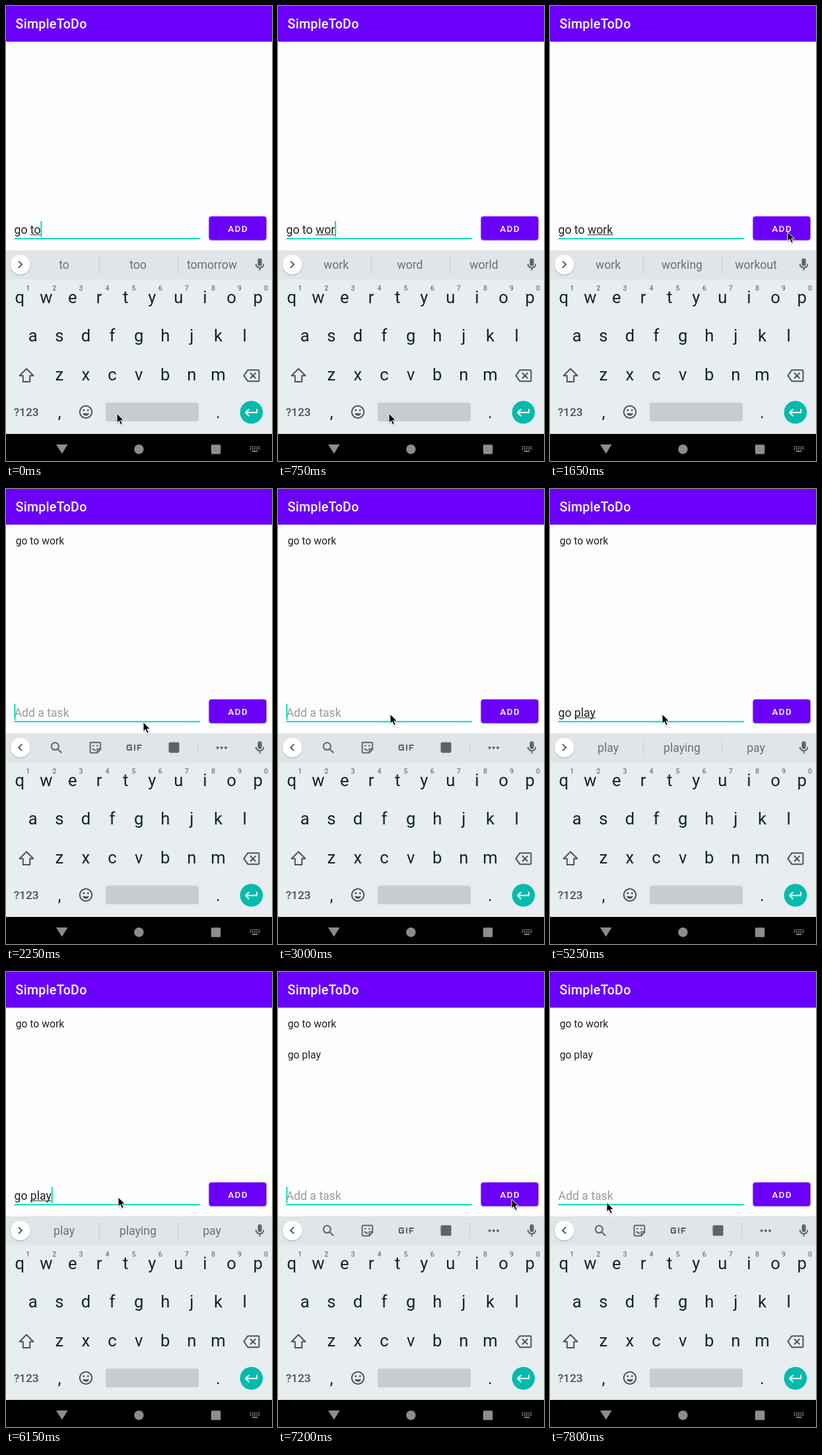
An HTML page for the animation above (8000 ms loop, 403x689 px).

```html
<!DOCTYPE html>
<html lang="en">
<head>
<meta charset="utf-8">
<title>To-do list</title>
<style>
  html, body { margin: 0; width: 100%; height: 100%; overflow: hidden; background: #fff; }
  svg { display: block; width: 403px; height: 689px; }
  text { font-family: Roboto, sans-serif; white-space: pre; }
  .mid { text-anchor: middle; }
  .medium { font-weight: 500; }
  .item { font-size: 15.7px; fill: #212121; }
  .field { font-size: 17.65px; }
  .key { font-size: 25.6px; fill: #0c262e; }
  .digit { font-size: 10.6px; fill: #6d777b; font-weight: 500; }
  .hint { font-size: 17.6px; fill: #667176; }
  .icon { fill: none; stroke: #5b666b; stroke-width: 2; }
  .solid { fill: #5b666b; }
  .dark { fill: none; stroke: #47565c; stroke-width: 2; }
</style>
</head>
<body>
<svg viewBox="0 0 403 689">
  <defs>
    <filter id="soft" x="-20%" y="-20%" width="140%" height="150%">
      <feDropShadow dx="0" dy="1" stdDeviation="1" flood-opacity=".3"/>
    </filter>
    <clipPath id="buttonClip"><rect x="307.5" y="318.5" width="87" height="36" rx="4"/></clipPath>
  </defs>

  <rect width="403" height="689" fill="#fefefe"/>
  <rect width="403" height="54" fill="#6a00fb"/>
  <text class="medium" x="14.6" y="33.8" font-size="19.6" letter-spacing=".245" fill="#fff">SimpleToDo</text>

  <text class="item" id="item0" x="14.7" y="83.6">go to work</text>
  <text class="item" id="item1" x="14.7" y="131">go play</text>

  <text class="field" id="placeholder" x="12.5" y="344.6" fill="#9a9a9a">Add a task</text>
  <text class="field" id="entry" x="12.5" y="344.6" fill="#212121"></text>
  <rect id="compose" y="346" height="1" fill="#333"/>
  <rect x="12.5" y="351.3" width="281.5" height="2" fill="#03dac5"/>
  <rect id="caret" y="325.5" width="2" height="24.5" fill="#03dac5"/>

  <rect x="307.5" y="318.5" width="87" height="36" rx="4" fill="#6a00fb" filter="url(#soft)"/>
  <circle id="ripple" r="40" fill="#fff" opacity=".16" clip-path="url(#buttonClip)"/>
  <text class="mid medium" x="351.5" y="342" font-size="13.7" letter-spacing="1.22" fill="#fff">ADD</text>

  <rect y="370" width="403" height="278" fill="#e8edf0"/>
  <rect y="370" width="403" height="43.5" fill="#e0e5e8"/>
  <circle cx="21.7" cy="391.5" r="14.7" fill="#fff" filter="url(#soft)"/>
  <path id="chevron" class="dark"/>
  <g id="mic">
    <rect class="solid" x="381.4" y="382" width="6.2" height="11.8" rx="3.1"/>
    <path class="icon" stroke-width="1.8" d="M378.6 390.5a5.9 5.9 0 0 0 11.8 0M384.5 396.5v4"/>
  </g>

  <g id="hints">
    <path d="M141.5 379.5v24M260.5 379.5v24" stroke="#c6cbce"/>
    <text class="hint mid" x="88" y="398.3"></text>
    <text class="hint mid" x="200" y="398.3"></text>
    <text class="hint mid" x="312" y="398.3"></text>
  </g>

  <g id="tools">
    <circle class="icon" cx="74.3" cy="389.6" r="5.5"/>
    <path class="icon" stroke-width="2.4" d="M78.4 393.7l5.8 5.8"/>
    <path class="icon" stroke-width="1.7" d="M129.2 383.8h12.4q1.6 0 1.6 1.6v9l-5 5h-9q-1.6 0-1.6-1.6v-12.4q0-1.6 1.6-1.6zM143 393.5h-4.6v5.6M131.2 392.6q1.4 3.2 5 2.8"/>
    <path class="icon" d="M131.2 388.8h2.4M137 388.8h2.4"/>
    <path class="icon" stroke-width="2.2" d="M191 388h-6.3q-1 0-1 1v5q0 1 1 1h5.2v-3.7h-3M195 386.9v9.2M199.7 396.1v-8.1h6M199.7 392h4.6"/>
    <rect class="solid" x="246.5" y="383.5" width="16" height="16" rx="2"/>
    <path d="M290.5 379.5v24" stroke="#c6cbce"/>
    <g class="solid"><circle cx="320.6" cy="391.8" r="2"/><circle cx="326.8" cy="391.8" r="2"/><circle cx="333" cy="391.8" r="2"/></g>
  </g>

  <g id="keys"></g>
  <path class="dark" stroke-linejoin="round" d="M31 549.3l10.4 10.5h-5.2v9.2h-10.4v-9.2h-5.2z"/>
  <path class="dark" stroke-linejoin="round" d="M366.4 551.2h15.8q1.2 0 1.2 1.2v14.6q0 1.2-1.2 1.2h-15.8l-6-8.5zM369.8 555.4l8.6 8.6M378.4 555.4l-8.6 8.6"/>
  <text class="mid medium" x="30.7" y="621" font-size="17.4" fill="#47565c">?123</text>
  <circle class="dark" cx="121" cy="614.7" r="9.2"/>
  <circle cx="117.8" cy="612" r="1.5" fill="#47565c"/><circle cx="124.2" cy="612" r="1.5" fill="#47565c"/>
  <path d="M116 616.8h10q-1.5 3.8-5 3.8t-5-3.8z" fill="#47565c"/>
  <rect x="151" y="600.5" width="141" height="28.5" rx="3" fill="#c9cdd1"/>
  <circle cx="371.8" cy="615.2" r="17.3" fill="#02bbaa"/>
  <path d="M380 610v5.6h-16.4M368.4 610.2l-5.2 5.4 5.2 5.4" fill="none" stroke="#fff" stroke-width="2"/>

  <rect y="648" width="403" height="41" fill="#000"/>
  <g fill="#8d8d8d">
    <path d="M76 664h17.5l-8.7 14z"/>
    <circle cx="201.4" cy="671.2" r="7.2"/>
    <rect x="310.8" y="664.2" width="14.4" height="14.2" rx="1"/>
    <path d="M369.5 667.6h15M369.5 670.8h15" stroke="#8d8d8d" stroke-width="1.9" stroke-dasharray="1.9 1.37"/>
    <rect x="372.8" y="673.4" width="8.5" height="1.9"/>
  </g>

  <path id="pointer" d="M0 0v14.2l3.2-3 2.5 5.8 2.6-1.1-2.5-5.6h4.5z" fill="#000" stroke="#fff" stroke-width="1" filter="url(#soft)"/>
</svg>
<script>
const LOOP = 8000, TICK = 150;
const $ = id => document.getElementById(id);

// [time, field contents]
const edits = [
  [0, "go to"], [300, "go to "], [450, "go to w"], [600, "go to wo"], [750, "go to wor"], [900, "go to work"],
  [1950, ""], [3750, "g"], [3900, "go"], [4050, "go "],
  [4350, "go p"], [4500, "go pl"], [4650, "go pla"], [4800, "go play"],
  [5400, "go pla"], [6150, "go play"], [7200, ""]
];
// [time, suggestions]; an empty string shows the toolbar
const hints = [
  [0, "to too tomorrow"], [300, "the bed sleep"], [450, "w work we"], [600, "wo work would"],
  [750, "work word world"], [900, "work working workout"], [1950, ""],
  [3750, "g good going"], [3900, "go good going"], [4050, "ahead to back"],
  [4350, "p play pick"], [4500, "pl play please"], [4650, "play place played"], [4800, "play playing pay"],
  [5550, "play place played"], [6150, "play playing pay"], [7200, ""]
];
// [time, x, y]
const route = [
  [0, 168, 617], [900, 168, 617], [1050, 215, 560], [1200, 300, 447], [1350, 393, 375], [1500, 372, 348],
  [1650, 360, 342], [1800, 360, 342], [1950, 354, 343], [2100, 290, 347], [2250, 208, 353],
  [3000, 170, 341], [6600, 170, 341], [6750, 225, 344], [6900, 310, 346], [7050, 353, 344],
  [7200, 354, 344], [7350, 342, 345], [7500, 286, 347], [7800, 86, 349]
];
const presses = [1800, 7050];

const pen = document.createElement("canvas").getContext("2d");
const textWidth = s => {
  pen.font = "17.65px Roboto, sans-serif";
  return pen.measureText(s).width;
};
const latest = (list, t) => list.filter(e => e[0] <= t).pop();
const show = (el, on) => el.setAttribute("visibility", on ? "visible" : "hidden");

function place(t) {
  const i = route.findIndex(p => p[0] > t);
  if (i < 0) return route[route.length - 1].slice(1);
  const [t0, x0, y0] = route[i - 1], [t1, x1, y1] = route[i];
  const k = (t - t0) / (t1 - t0);
  return [x0 + (x1 - x0) * k, y0 + (y1 - y0) * k];
}

function buildKeys() {
  const key = (cls, x, y, s) => `<text class="${cls} mid" x="${x}" y="${y}">${s}</text>`;
  const row = (chars, x, y, cls = "key") =>
    [...chars].map((c, i) => key(cls, x + i * 40.1, y, c)).join("");
  $("keys").innerHTML =
    row("qwertyuiop", 20.7, 450.3) + row("1234567890", 33.2, 431, "digit") +
    row("asdfghjkl", 40.7, 508.3) + row("zxcvbnm", 80.8, 566.6) +
    key("key", 81, 623.5, ",") + key("key", 321.4, 623.5, ".");
}

function draw(time) {
  const t = Math.floor(time / TICK) * TICK;
  const [at, text] = latest(edits, t);
  const words = latest(hints, t)[1].split(" ");
  const typing = words[0] !== "";

  show($("item0"), t >= 1950);
  show($("item1"), t >= 7200);
  show($("placeholder"), !text);
  $("entry").textContent = text;

  const word = text.match(/\S*$/)[0];
  $("compose").setAttribute("x", 12.5 + textWidth(text.slice(0, text.length - word.length)));
  $("compose").setAttribute("width", textWidth(word));
  $("caret").setAttribute("x", 12.4 + textWidth(text));
  show($("caret"), Math.floor((t - at + 60) / 500) % 2 === 0);

  show($("hints"), typing);
  show($("tools"), !typing);
  $("hints").querySelectorAll("text").forEach((el, i) => el.textContent = words[i] || "");
  $("chevron").setAttribute("d", typing ? "M19 386.4l5 5-5 5" : "M24.2 386.4l-5 5 5 5");

  const [x, y] = place(t);
  $("pointer").setAttribute("transform", `translate(${x} ${y})`);
  $("ripple").setAttribute("cx", x);
  $("ripple").setAttribute("cy", y);
  show($("ripple"), presses.includes(t));
}

buildKeys();
const start = performance.now();
function frame() {
  draw((performance.now() - start) % LOOP);
  requestAnimationFrame(frame);
}
frame();
</script>
</body>
</html>
```
